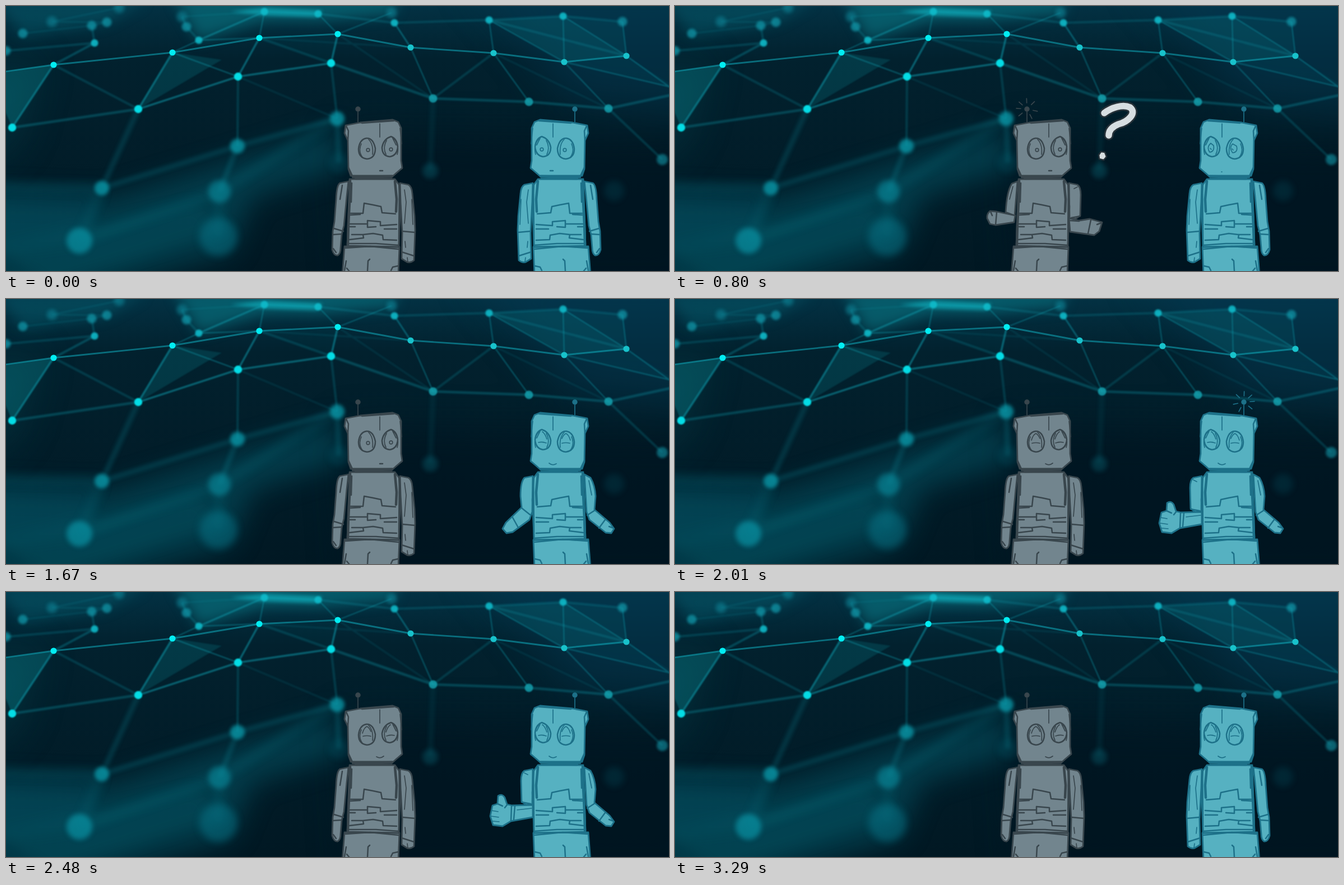
An HTML page that plays this animation: 1183 by 473 pixels, repeating every 3.82 s.

```html
<!DOCTYPE html>
<html lang="en">
<head>
<meta charset="utf-8">
<title>Two robots</title>
<style>
html, body { margin: 0; width: 100%; height: 100%; overflow: hidden; background: #021c28; }
svg { display: block; width: 1183px; height: 473px; }
.robot { fill: var(--skin); stroke: var(--ink); stroke-width: 2.8; stroke-linejoin: round; stroke-linecap: round; }
.robot .line { fill: none; stroke-width: 2.5; }
.robot .fine { fill: none; stroke-width: 1.7; }
.robot .bold { fill: none; stroke-width: 4.5; }
#grey { --skin: #72858e; --ink: #39464d; }
#blue { --skin: #56b1c1; --ink: #1d7189; }
</style>
</head>
<body>
<svg viewBox="0 0 1183 473">
  <defs>
    <linearGradient id="sky" x1="0" y1="0" x2="0" y2="1">
      <stop offset="0" stop-color="#033143"/>
      <stop offset=".2" stop-color="#02212e"/>
      <stop offset="1" stop-color="#011823"/>
    </linearGradient>
  </defs>
  <rect width="1183" height="473" fill="url(#sky)"/>
  <g id="net"></g>
  <g id="grey" class="robot"></g>
  <g id="blue" class="robot" transform="translate(1643 0) scale(-1 1)"></g>
</svg>
<script>
const $ = id => document.getElementById(id);

// Network: named nodes, joined by pairs of letters
const nodes = {
  A: [85, 105], B: [297, 83], C: [452, 57], D: [592, 50], E: [722, 74], F: [870, 84], G: [996, 100], H: [1107, 89],
  I: [236, 184], J: [414, 126], K: [580, 102], L: [762, 165], M: [933, 171], N: [1075, 183],
  O: [11, 217], P: [171, 325], Q: [413, 250], R: [591, 201], S: [757, 294], T: [1171, 274],
  U: [381, 331], V: [131, 419], W: [379, 412], X: [158, 66], Y: [344, 61], Z: [461, 10],
  a: [557, 14], b: [693, 30], c: [862, 25], d: [994, 18], e: [1100, 28], f: [0, 80], g: [30, 49],
  h: [82, 28], i: [153, 35], j: [180, 29], k: [314, 19], l: [322, 37], m: [688, 12], n: [202, 3],
  o: [-30, 121], p: [1200, 148], q: [1200, 156], r: [594, 280], s: [1085, 330], t: [-20, 322]
};

const layer = (blur, body, opacity = 1) => `<g style="filter:blur(${blur}px)" opacity="${opacity}">${body}</g>`;
const poly = (pts, fill, opacity) => `<polygon points="${pts}" fill="${fill}" opacity="${opacity}"/>`;
const face = (names, opacity) => poly([...names].map(n => nodes[n]).join(' '), '#0b8794', opacity);
const edges = (pairs, width, opacity, blur) => layer(blur,
  `<path d="${pairs.split(' ').map(p => `M${nodes[p[0]]}L${nodes[p[1]]}`).join('')}" fill="none" stroke="#0fa0b1" stroke-width="${width}"/>`, opacity);
const dots = (names, r, color, blur, opacity = 1) => layer(blur,
  [...names].map(n => `<circle cx="${nodes[n][0]}" cy="${nodes[n][1]}" r="${r}" fill="${color}"/>`).join(''), opacity);

$('net').innerHTML =
  layer(35, poly('820,-60 1250,-60 1250,190 1010,170', '#043a54', .5)
    + poly('600,230 1250,240 1250,520 620,520', '#00131e', .6)
    + poly('-50,120 60,90 20,240 -50,300', '#08606c', .25)) +
  layer(24, poly('-50,335 180,345 590,220 600,290 440,340 400,440 90,530 -50,530', '#077487', .36)) +
  layer(12, poly('-20,322 171,325 131,419 -20,440', '#08738a', .16)
    + poly('-20,430 340,350 390,400 80,500', '#0a8393', .12)
    + poly('-20,-10 250,-10 180,30 30,55', '#0a8393', .28)
    + poly('300,-15 700,-15 690,14 557,26 460,26 344,61', '#0b8c9a', .48)) +
  layer(3, poly('400,10 461,3 565,8 555,20 461,17', '#12b9c6', .6)) +
  layer(1, face('oAO', .36) + poly('297,83 236,184 385,96', '#0b8794', .24)
    + face('cdHG', .22) + face('deH', .1) + face('GHp', .08) + face('CDK', .05)) +
  edges('oA AB BC CD DE EF FG GH', 2.8, .6, .6) +
  edges('AO BI IJ JK CJ DK', 3.6, .5, 1) +
  edges('BJ Dm EL FM Hq GN Gp cF cG dG dH eH bE CZ aD Za YB YC YZ', 2.4, .38, .8) +
  edges('KL LM MN Nq OI', 4.5, .32, 1.5) +
  edges('AI CK FL NT KR JQ bc cd de ab Xf XA Xi lY cH YZ lk', 4, .24, 1.6) +
  edges('AX CE DL FN GH JR gi ij hj hn kZ Eb', 3, .15, 1.8) +
  edges('IP QP QR Rr QU', 9, .2, 3.5) +
  edges('LS', 9, .1, 3.5) +
  edges('tP PV UR UV UW', 18, .12, 8) +
  dots('ABCD', 5.6, '#02edf2', .5) +
  dots('EFGH', 5.6, '#18c2cb', .6) +
  dots('IJKO', 7.2, '#04dce5', 1) +
  dots('XYZabcd', 6.6, '#0fbccb', 1.4, .88) +
  dots('LMN', 7.5, '#15a5b2', 1.3, .8) +
  dots('efgijl', 8.5, '#129bad', 2.2, .7) +
  dots('hkmn', 9.5, '#0f8fa2', 3, .5) +
  dots('PQR', 13, '#0a9fb0', 3, .72) +
  dots('T', 10, '#108b9c', 2, .65) +
  dots('S', 14, '#0b7384', 4, .32) +
  dots('U', 20, '#0a93a5', 5, .55) +
  dots('V', 23, '#0a97a9', 4.5, .65) +
  dots('W', 34, '#087f93', 7, .45) +
  dots('rs', 18, '#087487', 6, .18);

// Robot: parts that depend on the state carry its names
const part = (when, body) => `<g data-when="${when}">${body}</g>`;
const path = (d, cls = '') => `<path class="${cls}" d="${d}"/>`;
const pupil = (x, y) => `<circle class="fine" cx="${x}" cy="${y}" r="2.8"/>`;
const rays = [-92, -45, 12, 62, 140, 184, 222].map(deg => {
  const at = r => [628 + r * Math.cos(deg * Math.PI / 180), 184 + r * Math.sin(deg * Math.PI / 180)];
  return `M${at(11)}L${at(19)}`;
}).join('');

const arms =
  part('down', path('M611 313L596 316Q590 319 589 345L586 385L583 402L582 435Q585 446 592 445Q597 442 597 432L599 408L603 392L608 340Z')
    + path('M585 397L602 402M584 408L599 407M600 320L596 345M584 433L589 440', 'line')
    + path('M703 316L718 319Q724 322 725 335L729 375L730 400L728 454Q720 460 714 456L706 451L707 405L704 350Z')
    + path('M707 402L729 404M706 439L728 446', 'line')
    + path('M711 328L714 350L711 388M724 345L726 390M712 420L713 431M716 449L717 457', 'fine')) +
  part('mid thumb', path('M611 313L600 319Q592 333 591 352L593 376L566 399L558 410L563 418L573 417L602 394L607 380Z')
    + path('M592 377L606 386M574 394L585 409M559 409L567 406', 'line') + path('M603 324L598 350', 'fine')) +
  part('mid', path('M703 316L718 319Q725 326 725 352L723 372L751 399L757 410L750 418L739 416L709 394L704 380Z')
    + path('M723 373L708 385M739 390L729 408', 'line')) +
  part('shrug', path('M611 313L601 317Q592 331 590 368L606 374Z')
    + path('M607 374L574 367L562 366Q556 371 557 379L562 389L572 391L605 386Z')
    + path('M574 368L572 391M563 367L566 374', 'line') + path('M603 322L597 345', 'fine')) +
  part('shrug thumb', path('M703 316L718 319Q724 323 724 337L723 374L715 380L704 379Z')
    + path('M707 378L723 375', 'line') + path('M712 326L718 323', 'fine')) +
  part('shrug', path('M703 379L721 383L740 380L762 386L757 402L748 409L705 403Z')
    + path('M742 382L737 406M705 383L721 384M753 390L761 387', 'line')) +
  part('thumb', path('M703 380L740 381L749 379L753 367Q758 359 765 364L766 378L775 381L779 400L774 416L757 418L742 409L703 402Z')
    + path('M741 382L742 408M735 382L737 406M749 380L753 385M766 378L757 382', 'line')
    + path('M777 390L765 392M778 400L764 402M775 409L763 410M705 386L731 389', 'fine'));

const body =
  path('M604 429L702 430L700 480L600 480Z') +
  path('M613 309L694 309L702 320L701 430L609 428Z') +
  path('M614 312L613 350L611 390L610 426M694 313L697 345L696 367', 'bold') +
  path('M617 316L616 350M701 318L704 358L701 425M609 424L660 424L701 427M606 432L650 429L700 434', 'line') +
  path('M615 373L632 372M615 370L637 370L639 352L655 355L669 358L671 369L695 371', 'line') +
  path('M614 389L645 389L645 383L668 385L668 392L697 390M645 389L645 395L660 394M614 394L623 394', 'line') +
  path('M613 417L638 414L637 408L655 406L672 409L673 417L697 418M617 408L637 408M675 398L697 398', 'line') +
  path('M607 455L604 472M645 473L646 455L649 452M687 472L690 466L699 464M608 468L613 474', 'line');

const head =
  path('M628 207L628 189', 'fine') +
  `<circle cx="628" cy="184" r="4" fill="var(--ink)" stroke-width="1.5"/>` +
  path('M606 213L632 208L690 203L700 207L705 218L705 276L707 289L691 303L615 303L611 291L610 240L604 227Z') +
  path('M607 214L611 223L610 240M611 288L618 303M635 209L692 205', 'line') +
  path('M703 218L706 246M695 299L707 290', 'fine') +
  path('M619 305L689 304M624 308L687 307', 'bold') +
  path('M667 210L667 234', 'fine') +
  path('M643 236Q655 235 659 254Q659 272 644 273Q629 271 629 255Q631 238 643 236Z', 'line') +
  path('M647 238Q656 247 654 265M634 246Q628 259 636 270', 'fine') +
  path('M687 233Q697 236 699 251Q698 267 685 269Q671 268 671 252Q674 237 687 233Z', 'line') +
  path('M690 235Q703 246 698 265M679 240Q672 253 678 265M690 236L696 248', 'fine');

const faces =
  part('open', pupil(646, 257) + pupil(687, 256) + path('M667 294L672 294', 'line')) +
  part('wide', path('M648 246Q655 253 648 262Q638 261 641 250ZM687 245Q695 252 689 261Q680 260 682 249Z', 'fine')
    + path('M649 255L647 257M688 254L686 256M667 296L668 296', 'fine')) +
  part('happy', path('M637 257.5Q644 255.5 651 257.5M679 257Q686 254.5 693 256', 'fine')
    + path('M636 252Q639 242 644 240Q649 243 651 249M678 250Q681 240 686 237', 'fine')
    + path('M661 294Q668 298 674 293', 'fine'));

const hook = 'M766 191C779 181 799 175 812 181C825 191 808 207 791 211Q774 218 774 231';
const ask =
  `<path d="${hook}" fill="none" stroke="#263138" stroke-width="17"/>` +
  `<path d="${hook}" fill="none" stroke="#d7dee1" stroke-width="11.5"/>` +
  `<path d="M760 260L767 261L770 269L765 275L757 273L756 266Z" fill="#d7dee1" stroke="#263138" stroke-width="2.5"/>`;

const robots = ['grey', 'blue'].map(id => {
  const el = $(id);
  el.innerHTML = arms + body + head + faces + part('spark', path(rays, 'fine')) + part('ask', ask);
  return [...el.querySelectorAll('[data-when]')];
});

// Start time in ms, then the state of each robot
const steps = [
  [0, 'down open', 'down open'],
  [200, 'mid open', 'down open'],
  [400, 'shrug open', 'down wide'],
  [600, 'shrug open ask', 'down wide'],
  [800, 'shrug open ask spark', 'down wide'],
  [940, 'shrug open ask', 'down wide'],
  [1040, 'mid open', 'down wide'],
  [1140, 'down open', 'down open'],
  [1670, 'down open', 'mid happy'],
  [1870, 'down happy', 'thumb happy spark'],
  [1940, 'down happy', 'thumb happy'],
  [2010, 'down happy', 'thumb happy spark'],
  [2080, 'down happy', 'thumb happy'],
  [2280, 'down happy', 'thumb happy spark'],
  [2480, 'down happy', 'thumb happy'],
  [3090, 'down happy', 'mid happy'],
  [3290, 'down happy', 'down happy']
];
const LOOP = 3820;
const start = performance.now();
let shown;

function draw() {
  const t = Math.max(0, performance.now() - start) % LOOP;
  const step = steps.findLast(s => s[0] <= t);
  if (step !== shown) {
    shown = step;
    robots.forEach((parts, i) => {
      const state = step[i + 1].split(' ');
      for (const p of parts)
        p.style.display = p.dataset.when.split(' ').some(w => state.includes(w)) ? '' : 'none';
    });
  }
  requestAnimationFrame(draw);
}
draw();
</script>
</body>
</html>
```
